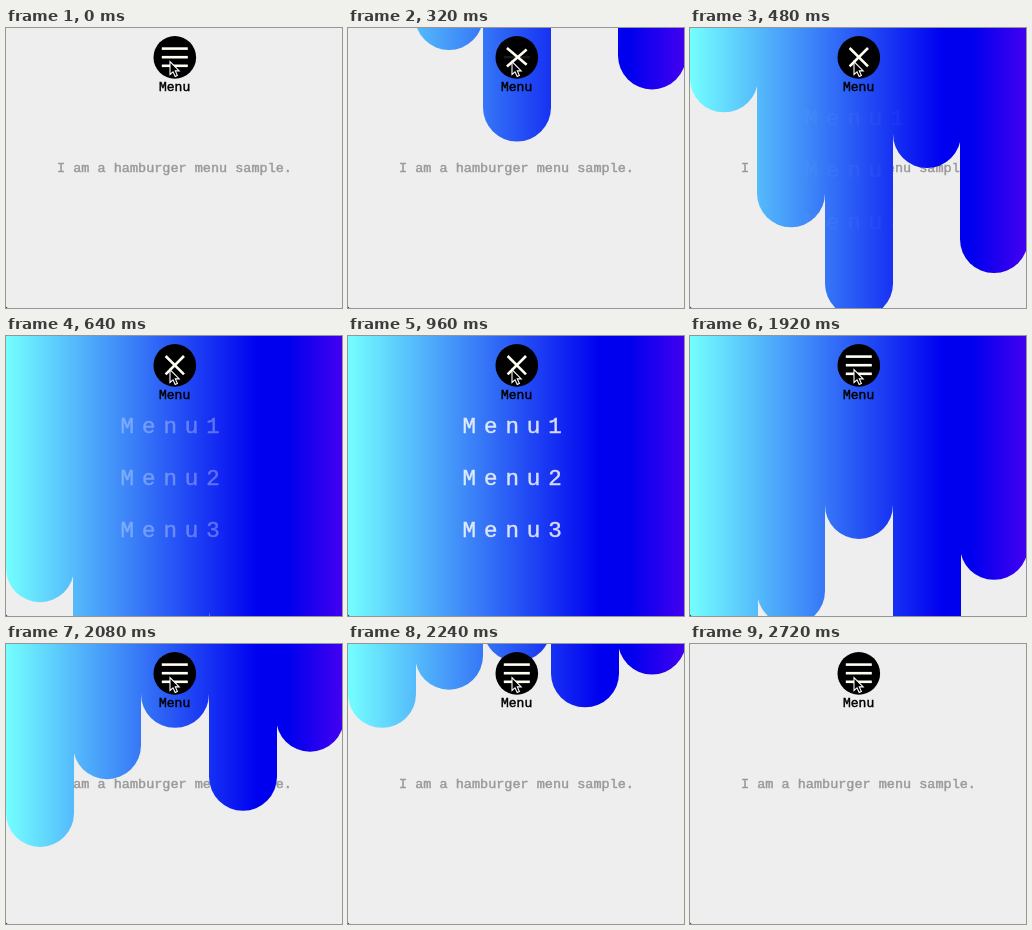
Write an HTML page that moves like this. It is 336 px wide and 280 px high and loops after 2880 ms.

```html
<!DOCTYPE html>
<html lang="en">
<head>
<meta charset="utf-8">
<title>Hamburger menu</title>
<style>
  html, body { margin: 0; width: 100%; height: 100%; overflow: hidden; background: #eee; }
  svg { display: block; width: 336px; height: 280px; }
  text {
    font: 13.5px "Liberation Mono", "Courier New", monospace;
    text-anchor: middle; fill: #000; stroke: #000; stroke-width: .45;
  }
  .note { fill: #999; stroke: #999; }
  .label { font-size: 13px; }
  .item { font-size: 22.5px; letter-spacing: 7.9px; fill: #fff; stroke: #fff; text-anchor: start; }
  #bars line { stroke: #fffff4; stroke-width: 2.6; }
</style>
</head>
<body>
<svg viewBox="0 0 336 280">
  <defs>
    <linearGradient id="sky" gradientUnits="userSpaceOnUse" x1="0" y1="0" x2="336" y2="0">
      <stop offset="0" stop-color="#74ffff"/>
      <stop offset=".75" stop-color="#0000f0"/>
      <stop offset=".84" stop-color="#0000ee"/>
      <stop offset="1" stop-color="#4200f0"/>
    </linearGradient>
  </defs>
  <rect width="336" height="280" fill="#eee"/>
  <text class="note" x="168.5" y="144">I am a hamburger menu sample.</text>
  <g id="drips" fill="url(#sky)"></g>
  <g id="items">
    <text class="item" x="114.6" y="97.3">Menu1</text>
    <text class="item" x="114.6" y="149.3">Menu2</text>
    <text class="item" x="114.6" y="201.3">Menu3</text>
  </g>
  <circle cx="168.8" cy="29.4" r="21.3"/>
  <g id="bars">
    <line x1="-13" x2="13"/>
    <line x1="-13" x2="13"/>
    <line x1="-13" x2="13"/>
  </g>
  <text class="label" x="168.6" y="63">Menu</text>
  <path d="M164 33.5V46.5L167 43.8L169.2 48.6L171.4 47.6L169.3 42.9H173.2Z" stroke="#fff" stroke-width="1.1"/>
  <path d="M0 278.5V280H1.5Z" fill="#333"/>
</svg>
<script>
const LOOP = 2880, STEP = 80;
const OPEN = 132, CLOSE = 1594;
const SLIDE = 1000, SPIN = 300;
const HIDDEN = -28, TRAVEL = 528, LENGTH = 900;
const openDelay = [185, 88, 0, 138, 46];
const closeDelay = [160, 80, 0, 120, 40];

const $ = id => document.getElementById(id);
const bars = [...$('bars').children];

const drips = openDelay.map((_, i) => {
  const rect = document.createElementNS('http://www.w3.org/2000/svg', 'rect');
  const attrs = { x: Math.floor(i * 67.7), width: 68, height: LENGTH, rx: 33.9 };
  for (const key in attrs) rect.setAttribute(key, attrs[key]);
  return $('drips').appendChild(rect);
});

// cubic-bezier(.25, .1, .25, 1)
function ease(x) {
  if (x <= 0) return 0;
  if (x >= 1) return 1;
  const curve = (a, b, s) => 3 * a * s * (1 - s) ** 2 + 3 * b * s * s * (1 - s) + s ** 3;
  let lo = 0, hi = 1;
  for (let i = 0; i < 24; i++) {
    const mid = (lo + hi) / 2;
    if (curve(.25, .25, mid) < x) lo = mid; else hi = mid;
  }
  return curve(.1, 1, lo);
}

// Eased 0 to 1 after opening, back to 0 after closing
function toggle(t, duration, inDelay = 0, outDelay = 0, outDuration = duration) {
  return ease((t - OPEN - inDelay) / duration) - ease((t - CLOSE - outDelay) / outDuration);
}

function draw(t) {
  drips.forEach((drip, i) => {
    const bottom = HIDDEN + TRAVEL * toggle(t, SLIDE, openDelay[i], closeDelay[i]);
    drip.setAttribute('y', bottom - LENGTH);
  });

  $('items').setAttribute('opacity', toggle(t, SLIDE, 300, 0, SPIN));

  const turn = toggle(t, SPIN);
  bars.forEach((bar, i) => {
    const side = i - 1;
    const y = 29.2 + side * 8.6 * (1 - turn);
    bar.setAttribute('transform', `translate(168.8 ${y}) rotate(${-side * 45 * turn})`);
  });
  bars[1].setAttribute('opacity', 1 - turn);
}

function tick() {
  const t = performance.now() % LOOP;
  draw(Math.floor(t / STEP) * STEP);
  requestAnimationFrame(tick);
}
tick();
</script>
</body>
</html>
```
